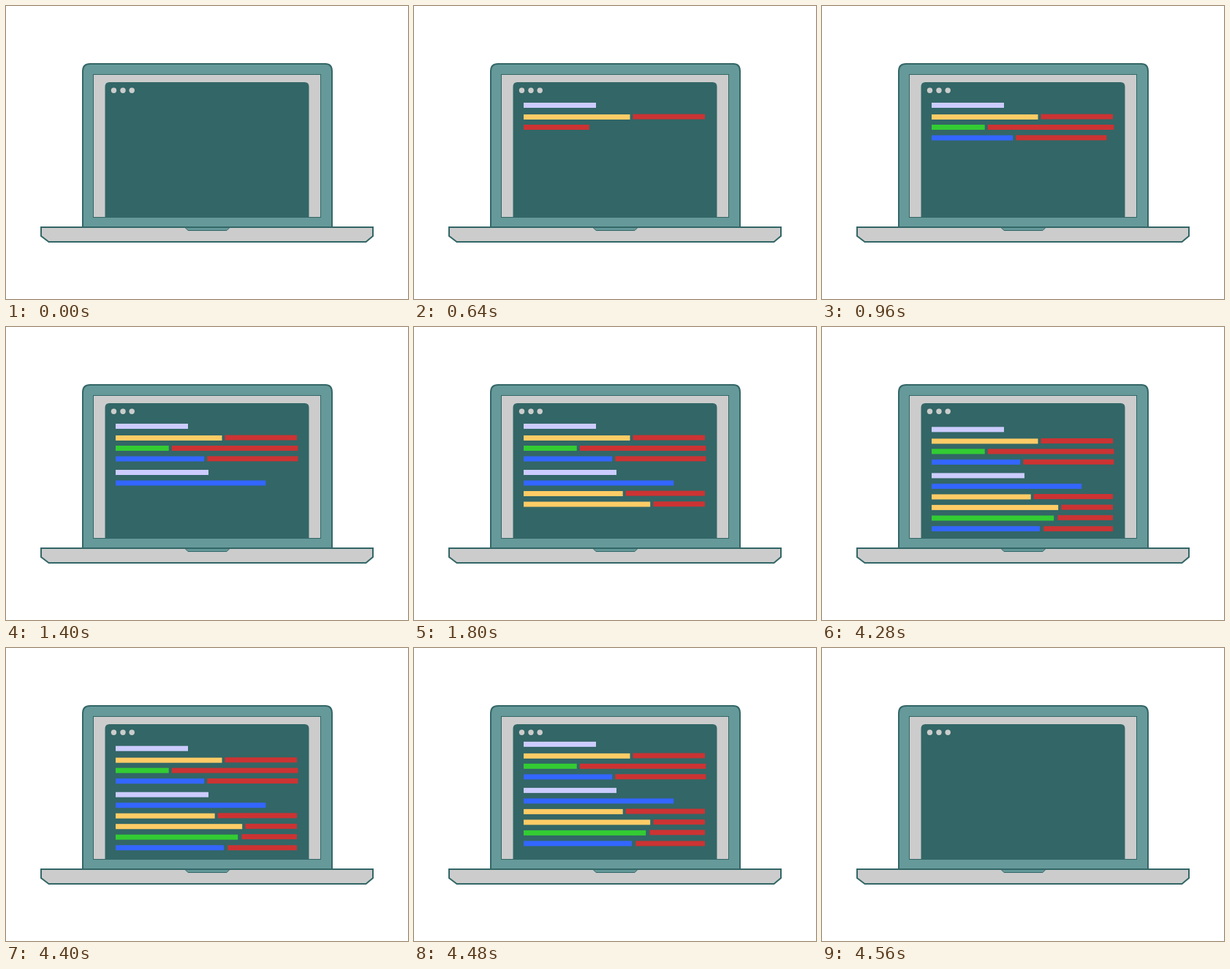
Recreate the animation shown at these times as an HTML page. Size 550x400 px, loop 4800 ms.

```html
<!DOCTYPE html>
<html lang="en">
<head>
<meta charset="utf-8">
<title>Laptop with code</title>
<style>
html, body { margin: 0; height: 100%; overflow: hidden; background: #fff; }
svg { display: block; width: 550px; height: 400px; }
</style>
</head>
<body>
<svg viewBox="0 0 550 400">
  <clipPath id="page"><rect x="150" y="104" width="264" height="184"/></clipPath>
  <g stroke="#366" stroke-width="2">
    <path fill="#699" d="M105 302V89Q105 79 115 79H437Q446 79 446 89V302Z"/>
    <path fill="#ccc" d="M48 302H502V314L492.5 322H58.5L48 314Z"/>
    <path fill="#699" stroke-width="1" d="M245 302.5L249 306.5H302L306 302.5"/>
    <path stroke="#366" d="M48 302H502"/>
    <rect fill="#ccc" stroke-width="1" x="119.5" y="93.5" width="311" height="195"/>
  </g>
  <path fill="#366" d="M135.5 289V110Q135.5 104 141.5 104H408.5Q414.5 104 414.5 110V289Z"/>
  <g fill="#ccc">
    <circle cx="147.5" cy="115.2" r="3.7"/>
    <circle cx="160" cy="115.2" r="3.7"/>
    <circle cx="172.2" cy="115.2" r="3.7"/>
  </g>
  <g clip-path="url(#page)"><g id="code"></g></g>
</svg>
<script>
const LEFT = 150, LOOP = 4800, TICK = 40, ROW_TICKS = 5;
const TYPE_START = 5, EXIT_START = 106, EXIT_END = 114;
const lilac = '#ccf', yellow = '#fc6', green = '#3c3', blue = '#36f', red = '#c33';

// y, colour, right edge, then left, right and y of the red bar
const rows = [
  [132, lilac, 249],
  [148, yellow, 295.5, 299.5, 398, 147.6],
  [162, green, 222.7, 226.8, 399.4, 162],
  [176.5, blue, 271.2, 275.3, 399.4, 176.3],
  [195, lilac, 277],
  [209.5, blue, 355.3],
  [224, yellow, 285.7, 289.7, 398, 223.6],
  [238.5, yellow, 323.2, 327.4, 398, 238.2],
  [253, green, 317.2, 322.5, 398, 252.4],
  [267.5, blue, 298, 303.3, 398, 267.5]
];

const code = document.getElementById('code');

function add(parent, tag, attrs) {
  const el = document.createElementNS('http://www.w3.org/2000/svg', tag);
  for (const key in attrs) el.setAttribute(key, attrs[key]);
  return parent.appendChild(el);
}

const bar = (g, x, y, right, fill) =>
  add(g, 'rect', { x, y, width: right - x, height: 7, fill });

const lines = rows.map(([y, fill, right, redLeft, redRight, redY]) => {
  const g = add(code, 'g');
  bar(g, LEFT, y, right, fill);
  if (redLeft) bar(g, redLeft, redY, redRight, red);
  return { g, width: (redRight || right) - LEFT };
});

// The page dips, then lifts before it vanishes
function exitShift(n) {
  if (n < 1) return 0;
  return n < 2 ? 4.4 : 7.5 - 2.9 * (n - 2);
}

function draw(now) {
  const tick = Math.floor(now % LOOP / TICK);
  code.setAttribute('visibility', tick < EXIT_END ? 'visible' : 'hidden');
  code.setAttribute('transform', `translate(0 ${exitShift(tick - EXIT_START)})`);
  lines.forEach(({ g, width }, i) => {
    const p = Math.min(1, Math.max(0, (tick - TYPE_START) / ROW_TICKS - i));
    g.setAttribute('transform', `translate(${-width * (1 - p) ** 2} 0)`);
  });
}

let start;
function frame(now) {
  start ??= now;
  draw(now - start);
  requestAnimationFrame(frame);
}
draw(0);
requestAnimationFrame(frame);
</script>
</body>
</html>
```
